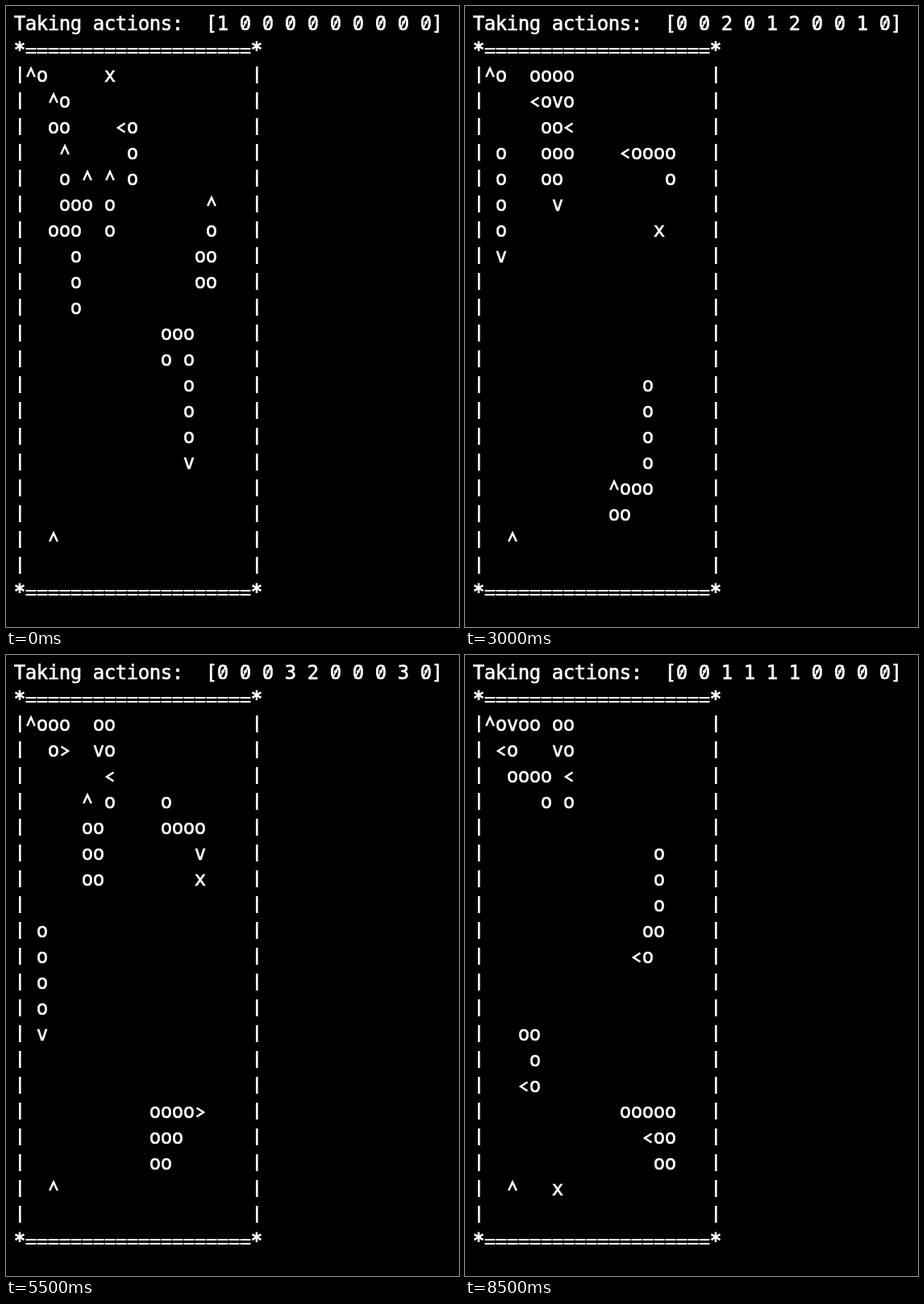
These frames come from a looping animation (562 px wide and 770 px high, 9 s). An HTML page with a canvas:

```html
<!DOCTYPE html>
<html lang="en">
<head>
<meta charset="utf-8">
<title>Snakes in a terminal</title>
<style>
  html, body { margin: 0; width: 100%; height: 100%; overflow: hidden; background: #000; }
  canvas { display: block; width: 562px; height: 770px; }
</style>
</head>
<body>
<canvas id="stage" width="562" height="770"></canvas>
<script>
const ctx = document.getElementById('stage').getContext('2d');
const STEP = 500, TICKS = 18, SIZE = 20;
const CELL_W = 14, CELL_H = 32, LEFT = 10, BASE = 30;

// Actions and headings: 0 up, 1 left, 2 down, 3 right.
const MOVES = [[-1, 0], [0, -1], [1, 0], [0, 1]];
const HEADS = '^<v>';
const FOOD = [[0, 7], [17, 11], [6, 15], [18, 6]];

// A body is the head cell followed by the path to the tail, in heading digits.
function snake(row, col, path, dir, actions) {
  const body = [[row, col]];
  for (const d of path) {
    const [r, c] = body[body.length - 1];
    body.push([r + MOVES[d][0], c + MOVES[d][1]]);
  }
  return { body, dir, actions: actions.padEnd(TICKS, '0'), dead: !actions };
}

const snakes = [
  snake(2, 8, '322', 1, '1010120'),
  snake(0, 0, '3', 0, ''),
  snake(3, 3, '2221', 0, '011202220220313221'),
  snake(15, 14, '00000112', 2, '021121003333322101'),
  snake(5, 16, '22210', 0, '000131123332202121'),
  snake(4, 5, '212222', 0, '000322221000011101'),
  snake(18, 2, '', 0, ''),
  { body: [], dir: 0, actions: '0'.repeat(TICKS), dead: true },
  snake(1, 2, '230', 0, '003312101123101120'),
  snake(4, 7, '22', 0, '0201')
];

const same = (a, b) => a[0] === b[0] && a[1] === b[1];
const outside = cell => cell.some(v => v < 0 || v >= SIZE);
const taken = cell => snakes.some(s => s.body.some(part => same(part, cell)));

let meal = 0;

function advance(s, tick) {
  if (s.dead) return;
  const action = +s.actions[tick];
  if ((action + 2) % 4 !== s.dir) s.dir = action;
  const next = s.body[0].map((v, i) => v + MOVES[s.dir][i]);
  const eats = same(next, FOOD[meal]);
  if (!eats) s.body.pop();
  if (outside(next) || taken(next)) {
    s.dead = true;
    return;
  }
  s.body.unshift(next);
  if (eats) meal++;
}

function snapshot(tick) {
  const cells = [[...FOOD[meal], 'x']];
  for (const s of snakes) {
    s.body.forEach((cell, i) => cells.push([...cell, i ? 'o' : HEADS[s.dir]]));
  }
  return { cells, actions: snakes.map(s => s.actions[tick]).join(' ') };
}

const frames = [];
for (let tick = 0; tick < TICKS; tick++) {
  if (tick) snakes.forEach(s => advance(s, tick));
  frames.push(snapshot(tick));
}

const STROKES = {
  '^': [[2.2, -6], [7, -16.5], [11.8, -6]],
  '<': [[11.5, -12.5], [3, -7], [11.5, -1.5]],
  '>': [[2.5, -12.5], [11, -7], [2.5, -1.5]],
  slash: [[3, -0.8], [11, -17]]
};

function stroke(points, x, y, width) {
  ctx.lineWidth = width;
  ctx.beginPath();
  for (const [px, py] of points) ctx.lineTo(x + px, y + py);
  ctx.stroke();
}

function put(ch, row, col) {
  const x = LEFT + col * CELL_W, y = BASE + row * CELL_H;
  if (ch === '|') {
    ctx.fillRect(x + 6, y - 19, 2.6, 21);
  } else if (ch === '=') {
    ctx.fillRect(x + 0.5, y - 10, 13, 2);
    ctx.fillRect(x + 0.5, y - 5, 13, 2);
  } else if (STROKES[ch]) {
    stroke(STROKES[ch], x, y, 2.5);
  } else {
    ctx.lineWidth = ch === '*' ? 1.2 : 0.6;
    ctx.fillText(ch, x + CELL_W / 2, y);
    ctx.strokeText(ch, x + CELL_W / 2, y);
    if (ch === '0') stroke(STROKES.slash, x, y, 1.7);
  }
}

function print(text, row) {
  [...text].forEach((ch, col) => { if (ch !== ' ') put(ch, row, col); });
}

function draw({ cells, actions }) {
  ctx.fillStyle = '#000';
  ctx.fillRect(0, 0, 562, 770);
  ctx.fillStyle = ctx.strokeStyle = '#fff';
  ctx.font = '24px "DejaVu Sans Mono", monospace';
  ctx.textAlign = 'center';
  const edge = '*' + '='.repeat(SIZE) + '*';
  print(`Taking actions:  [${actions}]`, 0);
  print(edge, 1);
  for (let r = 0; r < SIZE; r++) print('|' + ' '.repeat(SIZE) + '|', r + 2);
  print(edge, SIZE + 2);
  for (const [r, c, ch] of cells) put(ch, r + 2, c + 1);
}

let shown = -1;
const start = performance.now();

function play() {
  const tick = Math.floor((performance.now() - start) / STEP) % TICKS;
  if (tick !== shown) draw(frames[shown = tick]);
  requestAnimationFrame(play);
}
play();
</script>
</body>
</html>
```
